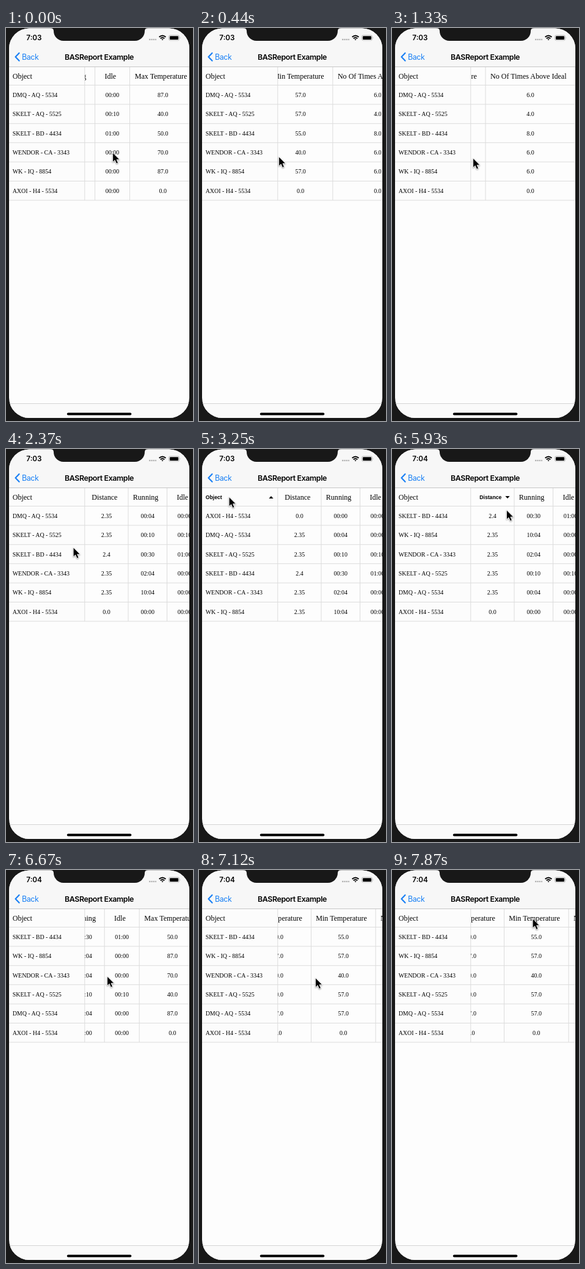
An HTML page that plays this animation: 306 px wide and 643 px high, repeating every 8000 ms.

```html
<!DOCTYPE html>
<html lang="en">
<head>
<meta charset="utf-8">
<title>Report table</title>
<style>
html, body { margin: 0; width: 100%; height: 100%; overflow: hidden; background: #181818; }
svg { display: block; width: 306px; height: 643px; }
.ui { font-family: Inter, "Open Sans", sans-serif; }
.nav { font-size: 12.4px; letter-spacing: -.03em; }
.strong { font-weight: 600; }
.cell { font: 9.95px "Liberation Serif", serif; }
.head { font: 12.05px "Liberation Serif", serif; }
.head.sorted { font: bold 8.7px "Liberation Sans", sans-serif; }
.mid { text-anchor: middle; }
.line { stroke: #dcdcdc; stroke-width: 1; fill: none; }
#cursor { filter: drop-shadow(0 1px 1px #0006); }
</style>
</head>
<body>
<svg viewBox="0 0 306 643">
  <defs>
    <clipPath id="screen"><rect x="5" y=".5" width="295" height="637.5" rx="33"/></clipPath>
    <clipPath id="pane"><rect x="129" y="63" width="171" height="221"/></clipPath>
  </defs>
  <rect width="306" height="643" fill="#181818"/>
  <g clip-path="url(#screen)">
    <rect width="306" height="643" fill="#fdfdfd"/>
    <rect width="306" height="63" fill="#f7f7f7"/>
    <rect y="614" width="306" height="29" fill="#fafafa"/>
    <path d="M5 614.5H300" stroke="#d4d4d4"/>
    <g id="table"></g>
    <path d="M5 63.5H300" stroke="#c6c6c6"/>
  </g>
  <path d="M72 0Q78 0 78 5A16 16 0 0 0 94 21H211A16 16 0 0 0 227 5Q227 0 233 0Z" fill="#181818"/>
  <g class="ui">
    <text id="clock" class="strong" x="33.3" y="20.4" font-size="11.7"></text>
    <text class="nav" x="26" y="51.5" fill="#1a80f5">Back</text>
    <text class="nav strong mid" x="152.5" y="51.5">BASReport Example</text>
  </g>
  <path d="M21.5 41L15.5 47.3L21.5 53.6" fill="none" stroke="#1a80f5" stroke-width="2.2" stroke-linecap="round" stroke-linejoin="round"/>
  <path d="M234 18.8H246" stroke="#b4b4b4" stroke-width="2.2" stroke-dasharray="2.4 .9"/>
  <g fill="none" stroke="#000" stroke-width="1.9">
    <path d="M250.6 14.8Q256 10.1 261.4 14.8M252.8 17.2Q256 14.4 259.2 17.2"/>
    <path d="M256 20.2L254.5 18.5Q256 17.3 257.5 18.5Z" fill="#000" stroke="none"/>
  </g>
  <rect x="266.4" y="11.9" width="17.2" height="8.3" rx="2.4" fill="none" stroke="#aaa" stroke-width=".8"/>
  <rect x="267.9" y="13.2" width="14.2" height="5.8" rx="1.3"/>
  <path d="M284.7 14.6Q286 16 284.7 17.6Z" fill="#aaa"/>
  <rect x="99.8" y="629.5" width="105.5" height="3.9" rx="1.95"/>
  <path id="cursor" d="M-.4 -.6V14.9L3.2 11.8L5.6 17.4L8.5 16.2L6.1 10.8H10.9Z" stroke="#fff" stroke-width=".9" stroke-linejoin="round"/>
</svg>
<script>
const LOOP = 8000, STEP = 148.2, LEFT = 129, TOP = 93.5, ROW = 31.4, TOP_RIGHT_GAP = 11;
const columns = [
  ["Distance", 71], ["Running", 63.5], ["Idle", 57], ["Max Temperature", 108.5],
  ["Min Temperature", 105.5], ["No Of Times Above Ideal", 147]
];
const records = [
  "DMQ - AQ - 5534|2.35|00:04|00:00|87.0|57.0|6.0",
  "SKELT - AQ - 5525|2.35|00:10|00:10|40.0|57.0|4.0",
  "SKELT - BD - 4434|2.4|00:30|01:00|50.0|55.0|8.0",
  "WENDOR - CA - 3343|2.35|02:04|00:00|70.0|40.0|6.0",
  "WK - IQ - 8854|2.35|10:04|00:00|87.0|57.0|6.0",
  "AXOI - H4 - 5534|0.0|00:00|00:00|0.0|0.0|0.0"
].map(line => line.split("|"));

// All times below are counted in display steps.
const clicks = [
  { at: 22, column: 0, direction: 1 }, { at: 27, column: 0, direction: -1 },
  { at: 36, column: 1, direction: 1 }, { at: 39, column: 1, direction: -1 }
];

const clamp = value => Math.min(1, Math.max(0, value));
const smooth = x => x * x * (3 - 2 * x);
const easeOut = x => 1 - (1 - x) ** 2;
const progress = (n, from, to, ease = smooth) => ease(clamp((n - from) / (to - from)));

function scrollAt(n) {
  const end = 381.5, middle = 245.5, first = 118;
  if (n < 9) return first + (end - first) * progress(n, 0, 6, easeOut);
  if (n < 40) return end * (1 - progress(n, 9, 15));
  return middle * progress(n, 42.6, 48);
}

// Pointer rests and travels: start, end, destination
const glides = [
  [0, 3, 131, 211], [7, 9, 133, 213.5], [9, 14, 252, 207], [15, 16, 110.5, 161.5],
  [16, 20, 49.5, 79], [29, 32, 157, 73], [33, 34, 160.5, 75], [39, 42, 266, 173],
  [42, 45, 166, 174.5], [46, 48, 191, 177], [49, 53, 230.5, 80]
];
function pointerAt(n) {
  return glides.reduce(([x, y], [from, to, toX, toY]) => {
    const p = progress(n, from, to);
    return [x + (toX - x) * p, y + (toY - y) * p];
  }, [175, 204.5]);
}

const byId = id => document.getElementById(id);
function add(parent, tag, attrs = {}, text = "") {
  const node = document.createElementNS("http://www.w3.org/2000/svg", tag);
  for (const key in attrs) node.setAttribute(key, attrs[key]);
  node.textContent = text;
  return parent.appendChild(node);
}

const table = byId("table");
const pane = add(add(table, "g", { "clip-path": "url(#pane)" }), "g");
const fixed = add(table, "g");
add(fixed, "rect", { x: 5, y: 64, width: 124, height: 218, fill: "#fcfcfc" });

function addColumn(parent, title, headX, cellX, right, align) {
  const baseline = row => TOP + ROW * (row + .5) + 3.5;
  return {
    head: add(parent, "text", { x: headX }, title),
    cells: records.map((_, row) => add(parent, "text", { x: cellX, y: baseline(row), class: "cell" + align })),
    arrow: add(parent, "path"),
    right,
    align
  };
}
const views = [addColumn(fixed, "Object", 10.7, 10.7, LEFT, "")];
let edge = LEFT;
for (const [title, width] of columns) {
  const center = edge + width / 2;
  edge += width;
  views.push(addColumn(pane, title, center - 3.2, center, edge, " mid"));
  add(pane, "path", { class: "line", d: `M${edge} 64V282` });
}

let grid = "M128.8 64V282";
for (let i = 0; i <= records.length; i++) grid += `M5 ${TOP + ROW * i}H300`;
add(table, "path", { class: "line", d: grid });

function sortBy(list, { column, direction }) {
  const value = record => column ? parseFloat(record[column]) : record[0];
  return [...list].sort((a, b) => direction * ((value(a) > value(b)) - (value(a) < value(b))));
}

function showSort(done) {
  const rows = done.reduce(sortBy, records);
  const last = done[done.length - 1];
  views.forEach(({ head, cells, arrow, right, align }, column) => {
    const sorted = last && last.column === column;
    cells.forEach((cell, row) => cell.textContent = rows[row][column]);
    head.setAttribute("class", "head" + align + (sorted ? " sorted" : ""));
    head.setAttribute("y", sorted ? 81.7 : 83);
    arrow.setAttribute("d", sorted
      ? `M${right - TOP_RIGHT_GAP - 3.6} ${79 + 2 * last.direction}h7.2l-3.6 ${-4 * last.direction}Z`
      : "");
  });
}

let shown = -1;
function render(t) {
  const n = Math.floor(t / STEP + .1);
  if (n === shown) return;
  shown = n;
  showSort(clicks.filter(click => click.at <= n));
  pane.setAttribute("transform", `translate(${-scrollAt(n)} 0)`);
  byId("cursor").setAttribute("transform", `translate(${pointerAt(n)})`);
  byId("clock").textContent = n < 36 ? "7:03" : "7:04";
}

const start = performance.now();
function tick() {
  render((performance.now() - start) % LOOP);
  requestAnimationFrame(tick);
}
tick();
</script>
</body>
</html>
```
